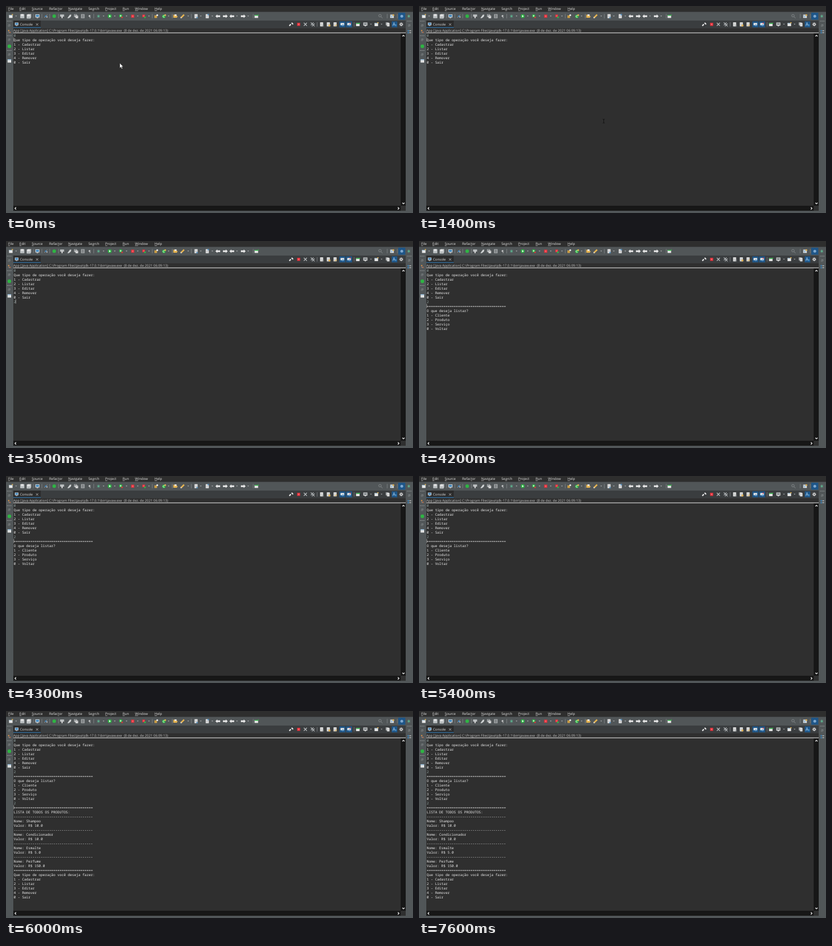
These frames come from a looping animation (726 px wide and 370 px high, 8 s). An HTML page:

```html
<!DOCTYPE html>
<html lang="pt">
<head>
<meta charset="utf-8">
<title>Console</title>
<style>
html, body { margin: 0; width: 100%; height: 100%; overflow: hidden; background: #515658; }
svg { display: block; width: 726px; height: 370px; }
text { font: 6.08px "Open Sans", "Noto Sans", sans-serif; fill: #e4e4e4; white-space: pre; text-rendering: geometricPrecision; }
.mono { font: 6.2px "Noto Sans Mono", "DejaVu Sans Mono", monospace; fill: #ececec; }
.input { fill: #93a5a3; }
.label { fill: #c4c4c4; }
</style>
</head>
<body>
<svg id="stage" viewBox="0 0 726 370" xmlns="http://www.w3.org/2000/svg"></svg>
<script>
const LOOP = 8000, ROW = 8, TOP = 48, LEFT = 13.8, ADVANCE = 3.72;

// Markup helpers
const rect = (x, y, w, h, fill) => `<rect x="${x}" y="${y}" width="${w}" height="${h}" fill="${fill}"/>`;
const dot = (x, y, r, fill) => `<circle cx="${x}" cy="${y}" r="${r}" fill="${fill}"/>`;
const shape = (d, fill) => `<path d="${d}" fill="${fill}"/>`;
const line = (d, color, w = 1) => `<path d="${d}" fill="none" stroke="${color}" stroke-width="${w}"/>`;
const text = (x, y, s, cls = '') => `<text x="${x}" y="${y}" class="${cls}">${s}</text>`;
const at = (x, y, s, scale = 1) => `<g transform="translate(${x} ${y}) scale(${scale})">${s}</g>`;
const icon = (x, y, s) => at(x, y, s, .9);

const white = '#e8e8e8', grey = '#a5a9ab', dim = '#74797b', blue = '#3f86bd',
      green = '#2fb344', red = '#e8303a', gold = '#e6b450', dark = '#3a3d3f', active = '#1f5688';

const page = rect(-3, -4, 6, 8, white) + line('M-1.8 -1.5h3.6M-1.8 .3h3.6M-1.8 2h3.6', grey, .7);
const disk = rect(-4, -4, 8, 8, '#c4c8ca') + rect(-2.3, -4, 4.6, 3, white) + rect(-2.3, 1, 4.6, 3, '#b4b9bb');
const fresh = rect(-4, -2.5, 7, 6, white) + rect(-4, -2.5, 7, 1.4, '#a9c6d8') + rect(1.6, -4.2, 2.2, 2.2, gold);
const screen = rect(-4, -3.6, 8, 6, white) + rect(-3, -2.7, 6, 4, blue) + rect(-1.5, 2.6, 3, 1.2, white);
const back = shape('M-5 0l4 -3.6v2h5.5v3.2h-5.5v2z', white);
const flip = s => `<g transform="scale(-1 1)">${s}</g>`;
const play = dot(0, 0, 3.7, green) + shape('M-1.2 -2.1l3.3 2.1l-3.3 2.1z', '#fff');
const stop = rect(-3, -3, 6, 6, red) + rect(-1.4, -1.4, 2.8, 2.8, '#f0656c');
const cross = line('M-3 -3l6 6M3 -3l-6 6', '#b4b8ba', 1.5);
const star = dot(2.2, -2.2, 1.7, gold);
const bug = dot(0, 0, 2, '#3fa06b') + line('M-3 -2l6 4M-3 2l6 -4M0 -3.5v7', '#73b5a0', .7);
const restore = rect(-2, -2.5, 4, 3.5, dim) + rect(-3, -1, 4, 3.5, '#666b6d');
const gear = line('M0 -4v8M-4 0h8M-2.8 -2.8l5.6 5.6M2.8 -2.8l-5.6 5.6', white, 1.1) +
             dot(0, 0, 2.6, white) + dot(0, 0, 1.2, dark);
const openIcon = rect(-4, -2.5, 7, 6, white) + rect(-4, -2.5, 7, 1.6, green) + shape('M1 -1l3 -3v2.5z', green);
const folder = shape('M-4 3v-6h3l1 1h3v2h2l-2 3z', gold) + rect(-1.5, -3.6, 4, 3, white);
const toggled = rect(-6, -6, 12, 12, active) + at(0, 0, rect(-4, -3, 8, 5, white) + rect(-1, 0, 4, 3.5, '#6fa6d2'), .9);

const mainIcons = [
  [9, fresh], [29, disk], [41, rect(-2.5, -4.3, 7, 7, '#a9aeb0') + at(-.6, .6, disk)], [56, screen],
  [71, line('M-3 3l6 -6', grey) + dot(0, 0, 1.6, blue) + rect(1, 0, 2.5, 3, grey)],
  [86, dot(0, 0, 3.5, green)],
  [100, rect(-4, -3.4, 8, 4.4, '#b9bdbf') + rect(-1, 0, 2, 4, white)],
  [113, shape('M-4 4l5 -7l3 0l-1 4l-4 3z', '#cfd2d3')],
  [125, rect(-4, -4, 6, 6, grey) + rect(-1, -1, 5, 5, white) + line('M-2.5 -2.5h3M.3 1h2.6', dark, .7)],
  [137, rect(-3.5, -4, 7, 8, grey) + line('M-2 -2h4M-2 0h4M-2 2h4', dark, .7)],
  [165, bug], [185, play], [205, at(-.5, -.6, play, .85) + rect(.6, 1.2, 3.2, 2.4, red)], [226, stop],
  [246, at(-.5, -.6, stop, .85) + dot(2, 2.2, 1.8, green)],
  [268, rect(-3.5, -1.5, 5, 5, gold) + dot(2, -2, 1.8, white) + line('M-3.5 1h5M-1 -1.5v5', '#8f6a27', .6)],
  [282, dot(-.5, .5, 3.4, green) + line('M.8 -.9a1.8 1.8 0 1 0 0 2.8', '#fff', .9) + star],
  [302, folder],
  [315, line('M-3 3l6 -6', gold, 3) + shape('M-4.2 4.2l.4 -3l2.6 2.6z', white)],
  [339, page + shape('M0 4h4l-2 -3z', blue)], [359, page + shape('M0 -4h4l-2 3z', blue)],
  [378, back], [391, flip(back)], [403, back], [423, flip(back)], [447, openIcon],
  [668, line('M1 1l3 3', '#8d9294') + `<circle cx="-1" cy="-1" r="2.5" fill="none" stroke="#8d9294" stroke-width=".9"/>`],
  [689, rect(-4, -3, 7, 6.5, white) + line('M-4 -.5h7M-1 -.5v4', blue, .8) + star],
  [706, rect(-7, -7, 14, 14, active) + dot(0, 0, 2.8, '#7fa9d0')],
  [718.5, bug]
];

const consoleIcons = [
  [509, line('M-4 3l3 -3.4M.5 -3l3 3', white, 2.4)],
  [522, stop], [534, cross], [547, at(-1, -1, cross, .9) + at(1.2, 1.2, cross, .9)],
  [563, page + line('M1 1l3 3M4 1l-3 3', grey, .9)],
  [575, page + rect(.5, .5, 3.5, 3.5, gold)],
  [587, page + line('M-1 2.5h4v-3', gold, 1.1)],
  [600, toggled], [612, toggled + rect(1, -3.5, 2, 2, red)],
  [628, openIcon], [641, rect(-4, -3.6, 8, 6, white) + rect(-3, -2.7, 6, 4, '#858b8e') + rect(-1.5, 2.6, 3, 1.2, white)],
  [661, fresh], [681, rect(-4, -4, 5.5, 6, grey) + at(.9, .6, page, .85)],
  [693, rect(-5.5, -6, 11, 12, active) + line('M-3.5 3l2.5 -6.5l2.5 6.5M-2.5 1h3', '#9cc3e4', 1) + dot(2.6, 1.5, 1.7, blue)],
  [705, gear]
];

const menus = [[4, 'File', 0], [24, 'Edit', 0], [46, 'Source', 0], [77, 'Refactor', 5], [111, 'Navigate', 0],
  [147, 'Search', 2], [177, 'Project', 0], [208, 'Run', 0], [230, 'Window', 0], [265, 'Help', 0]];
const mnemonic = (s, i) => s.slice(0, i) + `<tspan text-decoration="underline">${s[i]}</tspan>` + s.slice(i + 1);

const drops = (xs, y) => xs.map(x => shape(`M${x - 1.5} ${y - .8}h3l-1.5 1.7z`, '#b0b3b4')).join('');
const bars = (xs, y) => xs.map(x => line(`M${x} ${y - 4}v8`, '#85898b', .8)).join('');
const grips = (x, ys) => ys.map(y => `<path d="M${x - 4} ${y}h8" stroke="#b5b8b9" stroke-width="1" stroke-dasharray="1 1.2"/>`).join('');
const chevron = (x, y, angle) =>
  `<path transform="translate(${x} ${y}) rotate(${angle})" d="M-2 1l2 -2l2 2" fill="none" stroke="#eee" stroke-width="1.3"/>`;

function chrome() {
  return rect(0, 0, 726, 370, '#515658') + rect(0, 0, 726, 10.5, '#2e2e2e') +
    menus.map(([x, s, i]) => text(x, 6.9, mnemonic(s, i))).join('') +
    mainIcons.map(([x, s]) => icon(x, 18.2, s)).join('') + text(147.2, 20.8, '¶') +
    drops([18, 174, 194, 215, 235, 255, 290, 325, 347.5, 368, 412, 432], 18) +
    bars([49, 64, 78, 93.5, 156.5, 261, 296.5, 330.5, 441, 680, 698], 18.2) +
    rect(13, 26, 700, 13.5, '#3a3d3f') + rect(13, 26, 49, 13.5, '#2b2b2b') + rect(13, 37.7, 49, 1.5, '#316c9b') +
    at(19, 32.5, screen, .8) + text(25, 34.9, 'Console') +
    line('M53.5 31l4 4M57.5 31l-4 4', '#c8c8c8', .8) +
    consoleIcons.map(([x, s]) => icon(x, 32.8, s)).join('') +
    drops([651, 670], 32.6) + bars([555, 621], 32.8) +
    rect(13, 39.5, 700, 326.5, '#2f2f2f') +
    text(13, 45.9, 'App [Java Application] C:\\Program Files\\Java\\jdk-17.0.1\\bin\\javaw.exe  (8 de dez. de 2021 06:09:13)', 'label') +
    rect(704, 48, 9, 309, '#171717') + rect(13, 357, 691, 9, '#171717') +
    rect(13, 47.4, 700, 1.2, '#d2d2d2') +
    chevron(709, 53.3, 0) + chevron(709, 352.7, 180) + chevron(17, 361.7, -90) + chevron(700, 361.7, 90) +
    grips(6, [27, 53, 79.5]) + grips(719.5, [27]) +
    [[6, 35], [6, 60.5], [6, 87], [719.5, 35]].map(([x, y]) => icon(x, y, restore)).join('') +
    icon(6, 45.5, rect(-2.5, -3, 2.5, 2.5, '#c98a4b') + rect(0, .5, 2.5, 2.5, '#b06a4a') + line('M-1.5 0v2h2', grey, .7)) +
    icon(6, 72, dot(0, 0, 3.6, green)) +
    icon(6, 98, rect(-3.5, -3, 7, 6.5, white) + rect(-3.5, -3, 7, 1.4, '#7fb0d6') + line('M-1 -1v4.5', grey, .7)) +
    icon(719.5, 46, rect(-3.5, -3.2, 2.5, 2.5, blue) + rect(-3.5, .8, 2.5, 2.5, blue) + line('M0 -2h3.5M0 2h3.5', white, 1.2));
}

// Console session
const double = '='.repeat(38), single = '-'.repeat(38);
const mainMenu = ['Que tipo de operação você deseja fazer:', '1 - Cadastrar', '2 - Listar', '3 - Editar', '4 - Remover', '0 - Sair'];
const products = [['Shampoo', '10.0'], ['Condicionador', '10.0'], ['Esmalte', '5.0'], ['Perfume', '150.0']];
const rows = ['0', ...mainMenu, '2',
  double, 'O que deseja listar?', '1 - Cliente', '2 - Produto', '3 - Serviço', '0 - Voltar', '2',
  double, 'LISTA DE TODOS OS PRODUTOS:',
  ...products.flatMap(([name, price]) => [single, 'Nome: ' + name, 'Valor: R$ ' + price]),
  double, ...mainMenu];

// [start ms, value]: rows shown, and caret [row, column] or null when blinked off
const shown = [[0, 7], [3500, 8], [4100, 14], [5500, 15], [6000, rows.length]];
const carets = [[0, [1, 0]], [3500, [7, 1]], [4000, [8, 0]], [4900, null], [5400, [8, 0]],
  [5500, [14, 1]], [5900, [15, 0]], [6500, null], [7100, [15, 0]], [7600, null]];
const valueAt = (track, t) => track.filter(([start]) => start <= t).pop()[1];

const stage = document.getElementById('stage');
stage.innerHTML = chrome() +
  `<g id="rows">${rows.map((s, i) => text(LEFT, TOP + i * ROW + 7, s, s.length > 1 ? 'mono' : 'mono input')).join('')}</g>` +
  '<rect id="caret" width=".6" height="7.4" fill="#d8d8d8"/>' +
  '<path id="arrow" d="M203 102.3v8.6l2 -1.9l1.5 3.3l1.4 -.6l-1.5 -3.2h2.7z" fill="#fff" stroke="#111" stroke-width=".4"/>' +
  '<path id="beam" d="M327.8 202.4h1.2l.5 .4l.5 -.4h1.2M329.5 202.8v6M327.8 209.2h1.2l.5 -.4l.5 .4h1.2" fill="none" stroke="#080808" stroke-width=".7"/>';

const [rowGroup, caret, arrow, beam] = ['rows', 'caret', 'arrow', 'beam'].map(id => document.getElementById(id));
const show = (el, on) => el.setAttribute('visibility', on ? 'visible' : 'hidden');

function draw(now) {
  const t = now % LOOP, count = valueAt(shown, t), pos = valueAt(carets, t);
  [...rowGroup.children].forEach((el, i) => show(el, i < count));
  show(caret, pos);
  if (pos) {
    caret.setAttribute('x', LEFT - .2 + pos[1] * ADVANCE);
    caret.setAttribute('y', TOP + pos[0] * ROW + .4);
  }
  show(arrow, t < 400);
  show(beam, t >= 400 && t < 3500);
  requestAnimationFrame(draw);
}
draw(0);
</script>
</body>
</html>
```
